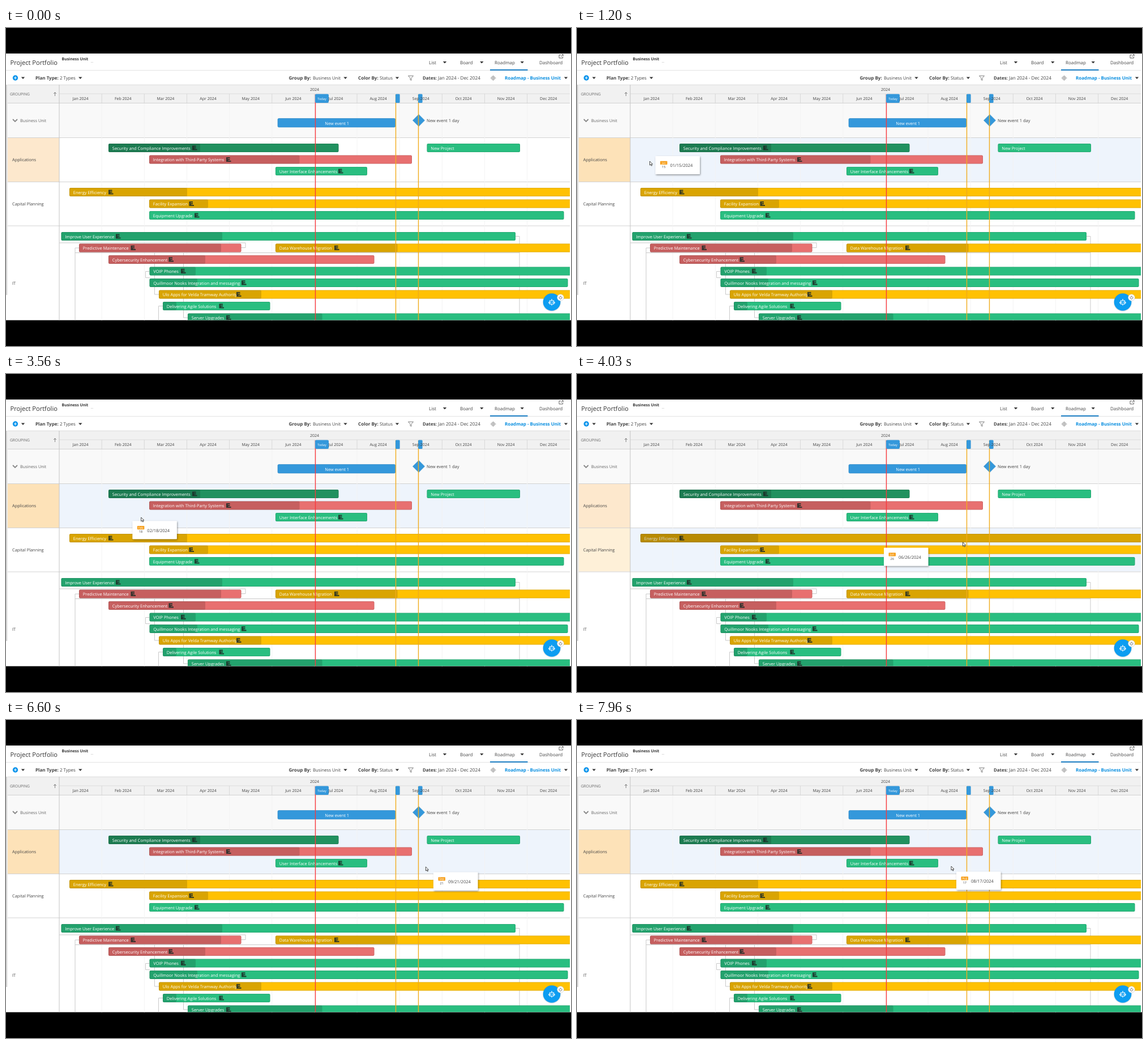
Animation, 998 px wide and 561 px high, one loop 8000 ms. Source, as an HTML page:

```html
<!DOCTYPE html>
<html lang="en">
<head>
<meta charset="utf-8">
<title>Project roadmap</title>
<style>
  html, body { margin: 0; width: 100%; height: 100%; overflow: hidden; background: #000; }
  svg { display: block; width: 100%; height: 100%; }
  text { font-family: "Open Sans", "Noto Sans", sans-serif; fill: #444; text-rendering: geometricPrecision; }
  .mid { text-anchor: middle; }
  .bold { font-weight: 700; }
  .line { fill: none; stroke: #c9c9c9; }
  .caret { fill: #333; }
  .hidden { visibility: hidden; }
  .hot { filter: brightness(.85); }
</style>
</head>
<body>
<svg id="stage" viewBox="0 0 998 561">
  <defs>
    <clipPath id="app"><rect y="45" width="998" height="470.5"/></clipPath>
    <clipPath id="chart"><rect x="94" y="100" width="902" height="415.5"/></clipPath>
    <filter id="shadow" x="-20%" y="-30%" width="140%" height="170%">
      <feDropShadow dx="1" dy="1.5" stdDeviation="1.6" flood-opacity=".4"/>
    </filter>
    <path id="plan" d="M0 0h6.5v2h-4v1h4v2h-3v1h5v2.2H0z" fill="#1d2b26" fill-opacity=".85"/>
  </defs>
  <rect width="998" height="561"/>
  <g clip-path="url(#app)">
    <rect y="45" width="998" height="471" fill="#fff"/>
    <g id="panels">
      <rect y="100" width="2.2" height="371" fill="#d2d2d2"/>
      <rect x="3" y="100" width="993" height="33" fill="#f1f1f1"/>
      <rect x="3" y="133" width="993" height="60.5" fill="#f9f9f9"/>
    </g>
    <g id="hover"></g>
    <g id="grid"></g>
    <g clip-path="url(#chart)">
      <path class="line" stroke="#bcbcbc" d="M94 379H423V387.5H415M129 388H122V516M122 396.5H907M900 367.5H907V516
        M262.500 396.500V470H270M313.500 396.500V511H321M253 429.500H246.500V440.500H254M277 490.500H269.500V516"/>
      <g id="bars"></g>
      <path d="M546.500 117V516" stroke="#f8383c" stroke-width="1.400"/>
      <path d="M729 152.500l10.500 10.500l-10.500 10.500l-10.500-10.500z" fill="#3498db" stroke="#2c86c3" stroke-width=".6"/>
      <path d="M688.500 117V516M728.500 117V516" stroke="#f1ab1c" stroke-width="1.400"/>
      <g fill="#3498db">
        <rect x="546" y="116.500" width="24" height="15.500" rx="2"/>
        <rect x="688" y="116.500" width="7.600" height="15.500" rx="1.500"/>
        <rect x="728" y="116.500" width="7.600" height="15.500" rx="1.500"/>
      </g>
    </g>
    <g id="labels"></g>
    <g id="icons">
      <path d="M855 74H921.500" stroke="#1d7fc4" stroke-width="1.800"/>
      <circle cx="16.500" cy="88" r="4.700" fill="#0a95ec"/>
      <path d="M14 88h5M16.500 85.500v5" stroke="#fff"/>
      <path d="M12 161l4 4l4-4" fill="none" stroke="#888" stroke-width="1.800"/>
      <path d="M86.500 120v-6.500M84 116l2.500-2.500l2.500 2.500" fill="none" stroke="#777" stroke-width=".9"/>
      <path d="M710.500 84.300h9l-3.500 4v4l-2-1v-3z" fill="none" stroke="#777" stroke-width=".9"/>
      <path d="M860.500 83.500v9.500M855.500 88.200h10M858 85.800h5v5h-5z" fill="none" stroke="#999" stroke-width=".9"/>
      <path d="M980 47.500h-3v5.500h6.500v-2.500M980 50.500l4-3.500M981.500 46.700h2.700v2.700" fill="none" stroke="#555" stroke-width=".9"/>
      <path d="M150 60.500h4" stroke="#bbb" stroke-width=".8" stroke-dasharray="1 .6"/>
    </g>
    <g>
      <circle cx="964" cy="484" r="16" fill="#000" opacity=".12"/>
      <circle cx="964" cy="483.500" r="15.300" fill="#0d9df1"/>
      <path d="M960.500 481h7v6h-7zM964 481v-3M959 483v3M969 483v3M964 487v2.500" fill="none" stroke="#fff" stroke-width="1.200"/>
      <path d="M962.500 483v2M965.500 483v2" stroke="#fff"/>
      <circle cx="979.500" cy="475.500" r="5.800" fill="#fff" stroke="#ccc" stroke-width=".7"/>
      <path d="M978 473.800a2.400 2.400 0 1 0 3 0M979.500 472.500v2.600" fill="none" stroke="#555" stroke-width=".8"/>
    </g>
    <g id="tip">
      <rect width="78.500" height="32" rx="1" fill="#fff" filter="url(#shadow)"/>
      <rect x="8.500" y="8.700" width="12.500" height="6.300" rx=".8" fill="#f7a01d"/>
      <text id="tipMonth" class="mid" x="14.700" y="13.700" font-size="5" style="fill:#fff"></text>
      <text id="tipDay" class="mid" x="14.700" y="21" font-size="5.600"></text>
      <text id="tipDate" x="26" y="19.200" font-size="7.500"></text>
    </g>
    <path id="cursor" d="M.5 0v7l1.700-1.500l1.200 2.600l1.200-.5l-1.200-2.500h2.200z" fill="#fff" stroke="#222" stroke-width=".8"/>
  </g>
</svg>
<script>
const $ = id => document.getElementById(id);

function add(parent, tag, attrs, content) {
  const node = document.createElementNS('http://www.w3.org/2000/svg', tag);
  for (const key in attrs) node.setAttribute(key, attrs[key]);
  if (content) node.textContent = content;
  parent.appendChild(node);
  return node;
}

function label(str, x, y, size, cls = '', color = '') {
  add($('labels'), 'text', { x, y, 'font-size': size, class: cls, style: color && `fill:${color}` }, str);
}

const LEFT = 94, MONTH = 75.15;
const MONTHS = 'Jan Feb Mar Apr May Jun Jul Aug Sep Oct Nov Dec'.split(' ');
const DAYS = MONTHS.map((_, i) => new Date(2024, i + 1, 0).getDate());

// Grid
const hLine = (y, x = 3, color = '#d2d2d2') => add($('grid'), 'path', { d: `M${x} ${y}H996`, stroke: color });
hLine(74.8, 0, '#e0e0e0');
hLine(100.3, 3, '#dcdcdc');
hLine(116, LEFT, '#dcdcdc');
[132.5, 193.5, 271.5, 349].forEach(y => hLine(y));
MONTHS.forEach((name, i) => {
  const x = LEFT + i * MONTH;
  if (i) {
    add($('grid'), 'path', { d: `M${x} 116V132`, stroke: '#d8d8d8' });
    add($('grid'), 'path', { d: `M${x} 133V516`, stroke: '#f3f3f3' });
  }
  label(`${name} 2024`, x + MONTH / 2, 127.2, 7, 'mid');
});
add($('grid'), 'path', { d: 'M94 100V516', stroke: '#c4c4c4' });

// Group rows that react to the pointer
const rows = [
  { top: 194, bottom: 271, idle: '#fde8cd', hot: '#fde2b8' },
  { top: 272, bottom: 348.5, idle: '#fff', hot: '#fef0d8' }
];
for (const row of rows) {
  const height = row.bottom - row.top;
  row.band = add($('hover'), 'rect', { x: LEFT, y: row.top, width: 902, height, fill: '#eef4fc' });
  row.cell = add($('hover'), 'rect', { x: 3, y: row.top, width: 91, height });
}

// Bars: name, color, row top, start, end, progress end, icon x
const GREEN = '#29be80', RED = '#e87070', GOLD = '#ffc102', DEEP = '#21915f', FAR = 1010;
const bars = [
  ['Security and Compliance Improvements', DEEP, 204, 181, 587.5, 343, 329],
  ['Integration with Third-Party Systems', RED, 224.5, 253, 717, 518.5, 389],
  ['User Interface Enhancements', GREEN, 245, 476, 638, 0, 587],
  ['New Project', GREEN, 204, 743.5, 908, 0, 0],
  ['Energy Efficiency', GOLD, 282, 112, FAR, 320, 181],
  ['Facility Expansion', GOLD, 302.5, 253, FAR, 357, 323.5],
  ['Equipment Upgrade', GREEN, 323, 253, 985.5, 0, 333],
  ['Improve User Experience', GREEN, 360, 97.5, 900, 382, 194],
  ['Predictive Maintenance', RED, 380.4, 129, 415.5, 380, 220.5],
  ['Data Warehouse Migration', GOLD, 380.4, 476, FAR, 691.5, 580],
  ['Cybersecurity Enhancement', RED, 400.9, 181, 650.5, 352, 287.5],
  ['VOIP Phones', GREEN, 421.4, 253.5, FAR, 335, 309],
  ['Quillmoor Nooks Integration and messaging', GREEN, 441.9, 253.5, 992.5, 338, 416],
  ['Ulo Apps for Velda Tramway Authority', GOLD, 462.4, 270, FAR, 451, 407],
  ['Delivering Agile Solutions', GREEN, 483, 277, 466.5, 301, 376.5],
  ['Server Upgrades', GREEN, 503.4, 321, FAR, 558.5, 389]
];
const barNodes = bars.map(([name, fill, y, x, end, done, icon]) => {
  const g = add($('bars'), 'g', {});
  const box = { x, y, height: 15, rx: 2 };
  add(g, 'rect', { ...box, width: end - x, fill });
  if (done) add(g, 'rect', { ...box, width: done - x, fill: '#000', 'fill-opacity': .15 });
  add(g, 'rect', { x: x + .4, y: y + .4, width: end - x - .8, height: 14.2, rx: 2, fill: 'none', stroke: '#000', 'stroke-opacity': .15, 'stroke-width': .8 });
  add(g, 'text', { x: x + 6.8, y: y + 10.6, 'font-size': 7.45, style: 'fill:#fff' }, name);
  if (icon) add(g, 'use', { href: '#plan', x: icon, y: y + 3.4 });
  return g;
});
const energyBar = barNodes[4];
add($('bars'), 'rect', { x: 480, y: 159.5, width: 207.7, height: 15.5, rx: 2, fill: '#3498db', stroke: '#2c86c3', 'stroke-width': .6 });

// Texts
const BLUE = '#0a8fe0';
label('New event 1', 584.7, 170.6, 7.45, 'mid', '#fff');
label('New event 1 day', 743, 165.8, 7.5);
label('Today', 558, 126.8, 5.7, 'mid', '#fff');
label('2024', 545, 111.2, 7, 'mid');
label('GROUPING', 7, 119, 6.7, '', '#666');
label('Business Unit', 25, 165.7, 7.3, '', '#666');
label('Applications', 11, 235.3, 7.4);
label('Capital Planning', 11, 313.2, 7.4);
label('IT', 11, 452.8, 7.4);
label('Project Portfolio', 7.5, 64.6, 11.1, '', '#333');
label('Business Unit', 98.5, 57.2, 6.9, 'bold', '#333');
label('List', 747, 63.9, 8);
label('Board', 802, 63.9, 8);
label('Roadmap', 863, 63.9, 8);
label('Dashboard', 942, 63.9, 8);
label('Plan Type:', 52, 91.2, 8, 'bold');
label('2 Types', 95, 91.2, 7.9);
label('Group By:', 499.5, 91.2, 8.1, 'bold');
label('Business Unit', 542, 91.2, 7.75);
label('Color By:', 622, 91.2, 8.1, 'bold');
label('Status', 660, 91.2, 7.9);
label('Dates:', 736, 91.2, 7.9, 'bold');
label('Jan 2024 - Dec 2024', 763, 91.2, 8.2);
label('Roadmap - Business Unit', 881, 91.2, 8, 'bold', BLUE);

const caret = (x, y) => add($('icons'), 'path', { class: 'caret', d: `M${x - 3.2} ${y - 1.7}h6.4l-3.2 3.6z` });
[775, 840.3, 911.7].forEach(x => caret(x, 60.7));
[30, 131.3, 599.5, 691, 989].forEach(x => caret(x, 88.2));

// Pointer path: time, x, y
const LOOP = 8000, TIP_LAG = 75, TIP_GAP = 9.5;
const path = [
  [430, 150, 45], [800, 140, 110], [1125, 129, 216], [1155, 128.5, 230], [1200, 128, 235],
  [1230, 128, 236], [1600, 138, 240], [1985, 161.5, 246], [2060, 171, 247], [2110, 176, 248],
  [2185, 182, 245], [3100, 182, 245], [3500, 215, 250], [3750, 310, 262], [3825, 374, 269],
  [3900, 455, 270], [3955, 530.5, 297], [4030, 680, 297], [4110, 760, 284], [4200, 794, 268],
  [4455, 784.5, 259], [5330, 784.5, 259], [6130, 756, 259.5], [6525, 745.5, 259],
  [6600, 741, 259], [6960, 707, 259], [7800, 664, 258.5], [7885, 660.5, 258]
];

function pointerAt(t) {
  const i = path.findIndex(p => p[0] > t);
  if (i === 0) return path[0].slice(1);
  if (i < 0) return path[path.length - 1].slice(1);
  const [t0, x0, y0] = path[i - 1], [t1, x1, y1] = path[i];
  const k = (t - t0) / (t1 - t0);
  return [x0 + (x1 - x0) * k, y0 + (y1 - y0) * k];
}

const place = (node, x, y) => node.setAttribute('transform', `translate(${x} ${y})`);
const show = (node, on) => node.classList.toggle('hidden', !on);
const pad = n => String(n).padStart(2, '0');

function drawTip(x, y) {
  const months = (x - LEFT) / MONTH, m = Math.floor(months);
  const day = Math.floor((months - m) * DAYS[m]) + 1;
  place($('tip'), x + TIP_GAP, y + TIP_GAP);
  $('tipMonth').textContent = MONTHS[m];
  $('tipDay').textContent = day;
  $('tipDate').textContent = `${pad(m + 1)}/${pad(day)}/2024`;
}

function render(t) {
  const [x, y] = pointerAt(t);
  const [tipX, tipY] = pointerAt(t - TIP_LAG);
  place($('cursor'), x, y);
  show($('cursor'), t >= path[0][0]);
  show($('tip'), tipY >= 133);
  drawTip(tipX, tipY);
  for (const row of rows) {
    const hot = y >= row.top && y < row.bottom;
    show(row.band, hot);
    row.cell.setAttribute('fill', hot ? row.hot : row.idle);
  }
  energyBar.classList.toggle('hot', y >= 282 && y <= 297.5);
}

const start = performance.now();
function tick() {
  render((performance.now() - start) % LOOP);
  requestAnimationFrame(tick);
}
tick();
</script>
</body>
</html>
```
